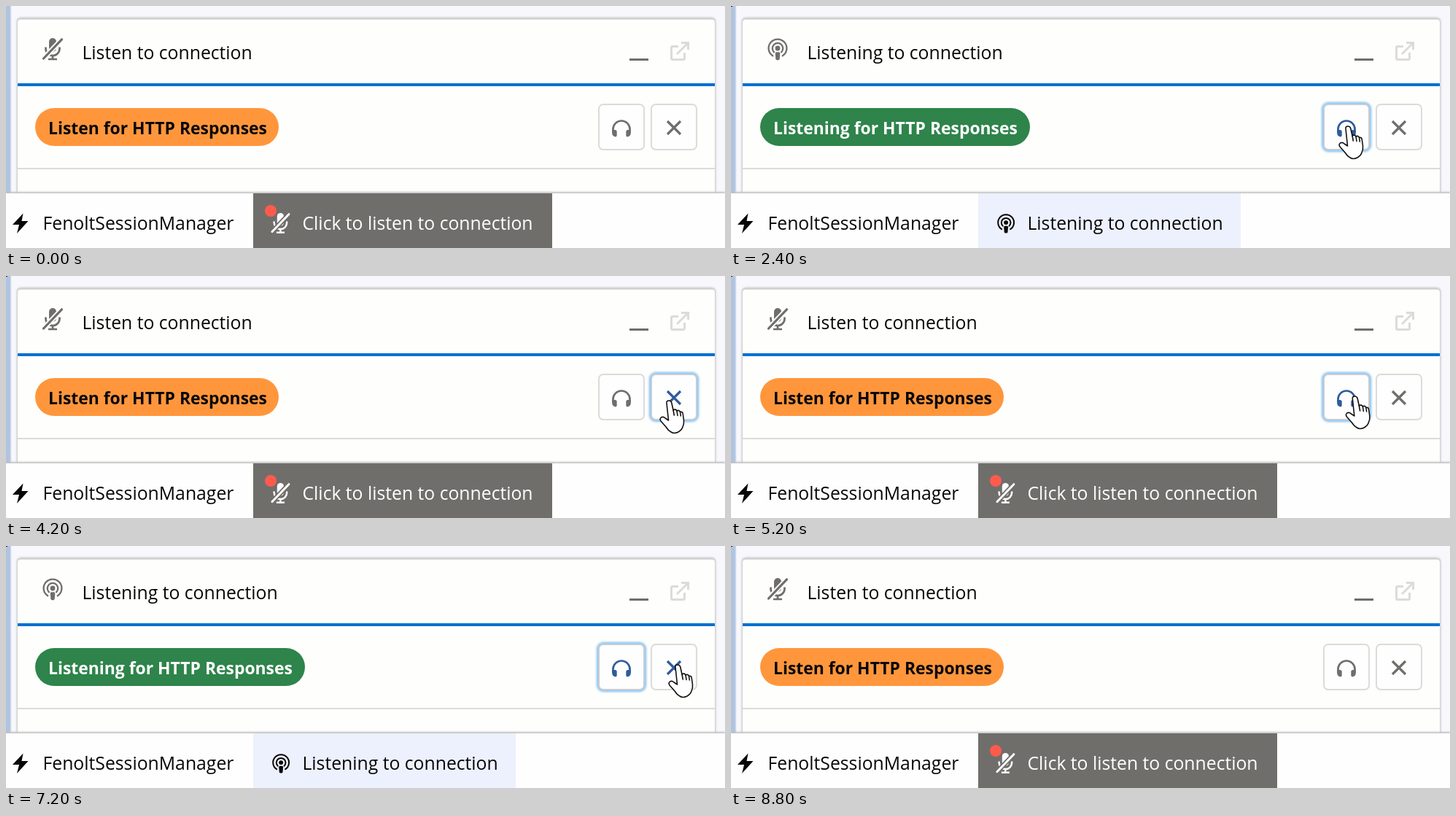
These frames come from a looping animation (986x332 px, 9000 ms). An HTML page:

```html
<!DOCTYPE html>
<html lang="en">
<head>
<meta charset="utf-8">
<title>Listen to connection</title>
<style>
html, body { margin: 0; width: 100%; height: 100%; overflow: hidden; background: #f8f8fc; }
svg { display: block; width: 986px; height: 332px; }
text { font-family: "Open Sans", "Noto Sans", sans-serif; font-size: 24.75px; fill: #080707; }
.bold { font-size: 22.9px; font-weight: 700; }
.btn { fill: #fefefe; stroke: #dddbda; stroke-width: 2; }
.glow { fill: none; stroke: #7cc0f4; stroke-width: 4; filter: blur(1.5px); }
.line { fill: none; stroke: currentColor; }
.solid { fill: currentColor; }
</style>
</head>
<body>
<svg viewBox="0 0 986 332">
  <defs>
    <linearGradient id="edge">
      <stop offset="0.65" stop-color="#b0c4df"/>
      <stop offset="1" stop-color="#f8f8fc"/>
    </linearGradient>
    <filter id="soft" x="-5%" y="-100%" width="110%" height="300%"><feGaussianBlur stdDeviation="1"/></filter>
    <g id="mic">
      <rect class="solid" x="9" y="0" width="10" height="19" rx="5"/>
      <path class="line" stroke-width="2.7" d="M4.5 12.5v2a9.5 9.5 0 0 0 19 0v-2M14 24v5M8 29h12"/>
    </g>
    <path id="slash" class="line" stroke-linecap="round" d="M26.5 1.8L1.5 28"/>
    <g id="cast">
      <path class="line" stroke-width="2.3" stroke-linecap="round" d="M7.2 24.300a12.400 12.400 0 1 1 13.600 0M9 19.300a7.200 7.200 0 1 1 10 0"/>
      <circle class="solid" cx="14" cy="14" r="3.400"/>
      <path class="solid" d="M10.700 21q0-1.800 1.800-1.800h3q1.800 0 1.800 1.800l-.6 7.500q-.2 1.800-1.800 1.800h-1.800q-1.600 0-1.800-1.800z"/>
    </g>
  </defs>

  <rect width="986" height="332" fill="#f8f8fc"/>
  <rect width="8" height="257" fill="url(#edge)"/>
  <rect x="14.500" y="15.500" width="959" height="270" rx="6" fill="#cbcbcd" filter="url(#soft)"/>
  <rect x="16" y="18.500" width="956" height="270" rx="4" fill="#fefefc"/>
  <rect x="16" y="106" width="956" height="4" fill="#0070d2"/>
  <rect x="16" y="222" width="956" height="2" fill="#dddbda"/>
  <rect x="855" y="72" width="26" height="3" fill="#706e6b"/>
  <path fill="none" stroke="#dddbda" stroke-width="3" d="M922 55.500h-8q-1.500 0-1.500 1.500v15q0 1.500 1.500 1.500h15q1.500 0 1.500-1.500v-8M920 66L935 51M926 50.500h9.500v9.500"/>

  <rect y="255" width="986" height="5" fill="#c2c2c4" filter="url(#soft)"/>
  <rect y="257" width="986" height="75" fill="#fefefe"/>
  <path fill="#080707" d="M23.500 284.500L9 300h9l-3 12 15.500-17H21.500z"/>
  <text x="50.500" y="307">FenoltSessionManager</text>

  <g id="idle">
    <g color="#706e6b" transform="translate(50 44)">
      <use href="#mic"/>
      <use href="#slash" color="#fefefc" stroke-width="7"/>
      <use href="#slash" stroke-width="3.200"/>
    </g>
    <text x="104.500" y="73">Listen to connection</text>
    <rect x="40" y="140" width="334" height="52" rx="26" fill="#ff963c"/>
    <text class="bold" x="58" y="176">Listen for HTTP Responses</text>
    <rect x="339" y="257" width="410" height="75" fill="#706e6b"/>
    <g color="#fefefe" transform="translate(363.500 284) scale(.92)">
      <use href="#mic"/>
      <use href="#slash" color="#706e6b" stroke-width="7"/>
      <use href="#slash" stroke-width="3.200"/>
    </g>
    <circle cx="363" cy="281" r="8" fill="#ff5b4d"/>
    <text x="406.500" y="307" style="fill:#fff">Click to listen to connection</text>
  </g>

  <g id="live">
    <use href="#cast" color="#706e6b" x="50" y="44"/>
    <text x="104.500" y="73">Listening to connection</text>
    <rect x="40" y="140" width="370" height="52" rx="26" fill="#2e844a"/>
    <text class="bold" x="58" y="176" style="fill:#fff">Listening for HTTP Responses</text>
    <rect x="339" y="257" width="360" height="75" fill="#ecf1fd"/>
    <use href="#cast" color="#080707" transform="translate(364.800 284.800) scale(.88)"/>
    <text x="406.500" y="307">Listening to connection</text>
  </g>

  <g id="phones">
    <rect class="glow" x="812" y="134" width="64" height="64" rx="7"/>
    <rect class="btn" x="813" y="135" width="62" height="62" rx="6"/>
    <path class="line" stroke-width="2.700" d="M832.500 174v-5a11.500 11.500 0 0 1 23 0v5"/>
    <path class="solid" d="M831.200 170h4q2.500 0 2.500 2.500v5q0 2-2 2-4.500-1-4.500-5zM856.800 170h-4q-2.500 0-2.500 2.500v5q0 2 2 2 4.500-1 4.500-5z"/>
  </g>
  <g id="close">
    <rect class="glow" x="884" y="134" width="64" height="64" rx="7"/>
    <rect class="btn" x="885" y="135" width="62" height="62" rx="6"/>
    <path class="line" stroke-width="3.200" d="M907 158l18 18M925 158l-18 18"/>
  </g>

  <rect id="speck" width="2" height="1" fill="#222"/>
  <g id="cursor" fill="#fff" stroke="#111" stroke-width="1.600" stroke-linejoin="round" stroke-linecap="round">
    <path id="arrow" d="M0 0V32l7.500-7 5 11.500 5-2.200-5-11.300h10z"/>
    <g id="hand">
      <path d="M-4 3.500Q-4.500 0-1 0 2 0 2.800 3L5 13Q8.300 10.800 10 14 13 12.200 14.500 15.500 17.800 14.500 18.300 18.500L19.500 27Q20 32 18 36 17 40 12 43 6 46 2 43-2 41-5 36L-12 28Q-14 25-11.500 23-8.500 21.500-6 24L-1.500 27Z"/>
      <path fill="none" d="M5 13l1.300 7M10 14l1 6.500M14.500 15.500l.8 5.500"/>
    </g>
  </g>
</svg>
<script>
const LOOP = 9000, STEP = 200;
const $ = id => document.getElementById(id);
const show = (el, on) => el.setAttribute("visibility", on ? "inherit" : "hidden");

// time, x, y of the pointer
const path = [
  [200, 955, 270], [600, 946, 232], [1000, 920, 184], [1200, 906, 170], [1400, 843, 165],
  [1800, 844, 165], [2400, 847, 165],
  [2600, 856, 168], [3000, 912, 205], [3400, 972, 245],
  [3600, 925, 186], [3800, 911, 171], [4200, 910, 171],
  [4600, 908, 171], [4800, 890, 169], [5000, 857, 165], [5600, 855, 165],
  [6000, 858, 166], [6400, 886, 180], [6800, 915, 168], [7000, 920, 163], [7200, 922, 163],
  [7800, 920, 165], [8000, 944, 182], [8200, 974, 208]
];

function pointer(t) {
  const i = path.findIndex(p => p[0] > t);
  if (i < 0) return path[path.length - 1].slice(1);
  if (i === 0) return path[0].slice(1);
  const [t0, x0, y0] = path[i - 1], [t1, x1, y1] = path[i];
  const k = (t - t0) / (t1 - t0);
  return [x0 + (x1 - x0) * k, y0 + (y1 - y0) * k];
}

const within = (t, spans) => spans.some(([a, b]) => t >= a && t < b);

function button(id, focus, hover) {
  const el = $(id);
  show(el.querySelector(".glow"), focus);
  el.querySelector(".btn").style.stroke = focus ? "#c9ccd3" : "";
  el.style.color = focus || hover ? "#2f5c9c" : "#706e6b";
}

function draw(time) {
  const t = Math.floor(time / STEP) * STEP;
  const visible = within(t, [[200, 8400]]);
  const [x, y] = pointer(t);
  const over = left => visible && x >= left && x < left + 64 && y >= 134 && y < 198;
  const onPhones = over(812), onClose = over(884);
  const onButton = onPhones || onClose;
  const live = within(t, [[1800, 4000], [5400, 7600]]);

  show($("idle"), !live);
  show($("live"), live);
  button("phones", within(t, [[1600, 3800], [5200, 7400]]), onPhones);
  button("close", within(t, [[3800, 5200], [7400, 8800]]), onClose);
  show($("speck"), t >= STEP);
  show($("hand"), visible && onButton);
  show($("arrow"), visible && !onButton);
  $("cursor").setAttribute("transform", `translate(${x} ${y})`);
}

const start = performance.now();
function tick() {
  draw((performance.now() - start) % LOOP);
  requestAnimationFrame(tick);
}
tick();
</script>
</body>
</html>
```
